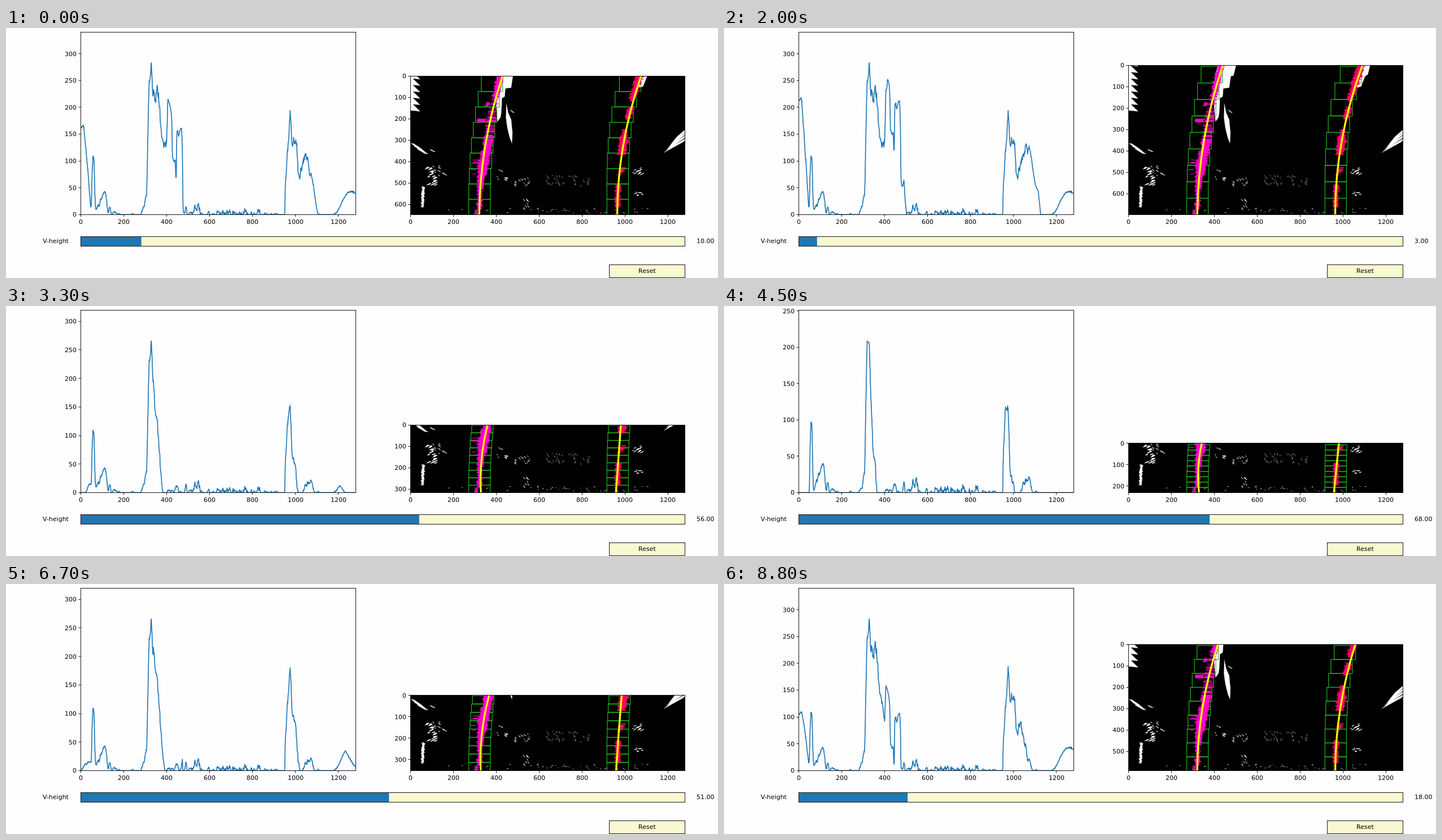
An HTML page with a canvas for the animation above (9800 ms loop, 1261 by 444 pixels).

```html
<!DOCTYPE html>
<html lang="en">
<head>
<meta charset="utf-8">
<title>Lane histogram with crop slider</title>
<style>
  html, body { margin: 0; width: 100%; height: 100%; overflow: hidden; background: #fefdff; }
  canvas { display: block; width: 1261px; height: 444px; }
</style>
</head>
<body>
<canvas id="stage" width="1261" height="444"></canvas>
<script>
const W = 1261, H = 444, LOOP = 9800;
const COLS = 1280, ROWS = 720, SCALE = 0.38; // road image and its size on the stage
const PLOT = { left: 132.7, right: 619, top: 7.8, bottom: 331.4 };
const VIEW = { left: 716.2, right: 1202.5, bottom: 331.7 };
const BLUE = '#1f77b4', CREAM = '#f9f9d1', PAPER = '#fefdff';
const PINK = 'rgb(255,0,200)', RED = 'rgb(255,0,100)';

// Slider value (percent cropped from the top) from each moment on.
const TIMELINE = [
  [0, 10], [400, 9], [700, 7], [1000, 4], [1200, 2], [1500, 1], [2000, 3],
  [2300, 6], [2500, 14], [2600, 22], [2800, 33], [3000, 42], [3100, 50], [3300, 56],
  [3400, 59], [3600, 62], [3700, 64], [3900, 66], [4500, 68],
  [6000, 66], [6200, 63], [6400, 59], [6500, 55], [6700, 51], [6900, 37],
  [7200, 27], [7500, 26], [7700, 24], [7800, 21], [8000, 18],
];

const mix = (a, b, t) => a + (b - a) * t;
const clamp01 = t => Math.min(1, Math.max(0, t));
const snap = n => Math.floor(n) + 0.5;

function random(seed) {
  return () => (seed = seed * 16807 % 2147483647) / 2147483647;
}
const rnd = random(271828);

// Layers are drawn in image pixels, with heights measured up from the bottom.
function layer(draw) {
  const canvas = document.createElement('canvas');
  canvas.width = COLS;
  canvas.height = ROWS;
  const g = canvas.getContext('2d');
  g.setTransform(1, 0, 0, -1, 0, ROWS);
  draw(g);
  return canvas;
}

function polygon(g, ...points) {
  g.beginPath();
  for (let i = 0; i < points.length; i += 2) g.lineTo(points[i], points[i + 1]);
  g.fill();
}

function streak(g, x1, y1, x2, y2, width) {
  const dx = (x2 - x1) * 0.3, dy = (y2 - y1) * 0.3;
  polygon(g, x1, y1, x1 + dx, y1 + dy + width / 2, x2, y2, x2 - dx, y2 - dy - width / 2);
}

function scatter(g, count, x, y, w, h, length, slope, width = 5) {
  for (let i = 0; i < count; i++) {
    const px = x + rnd() * w, py = y + rnd() * h, l = length * (0.4 + rnd());
    streak(g, px, py, px + l, py + l * slope, width);
  }
}

// Ragged band through [height, left, right] stations.
function smear(g, stations, density = 1, rough = 12) {
  for (let i = 1; i < stations.length; i++) {
    const [y1, l1, r1] = stations[i - 1], [y2, l2, r2] = stations[i];
    for (let y = y1; y < y2; y += 3) {
      const t = (y - y1) / (y2 - y1);
      const left = mix(l1, l2, t) + (rnd() - 0.5) * rough;
      const right = mix(r1, r2, t) + (rnd() - 0.5) * rough;
      if (rnd() < density) g.fillRect(left, y, right - left, Math.min(3, y2 - y));
    }
  }
}

const whiteLayer = layer(g => {
  g.fillStyle = '#fff';
  for (let y = 483; y < ROWS; y += 30) polygon(g, 0, y + 45, 46, y, 8, y + 4, 0, y + 4);
  for (let i = 0; i < 3; i++) streak(g, i * 14, 335 - i * 13, 56 + i * 14, 306 - i * 11, 12);
  for (let i = 0; i < 4; i++) streak(g, 1178 + i * 12, 288 + i * 14, 1310, 372 + i * 17, 15);
  streak(g, 88, 305, 118, 294, 6);
  streak(g, 463, 490, 486, 476, 6);
  // Beside the left lane, a loose blob, and beside the right lane.
  polygon(g, 406, 435, 420, 455, 424, 477, 427, 545, 440, 552, 443, 590, 470, 594, 478, 648,
    490, 650, 502, 698, 512, 720, 424, 720, 404, 648, 400, 500);
  polygon(g, 447, 524, 455, 480, 470, 445, 476, 385, 474, 332, 463, 360, 452, 405, 445, 455);
  polygon(g, 1060, 590, 1085, 600, 1104, 648, 1116, 655, 1127, 698, 1140, 720, 1090, 720);
  smear(g, [[35, 51, 62], [132, 54, 67]], 1, 6);
  scatter(g, 20, 58, 135, 55, 85, 20, 0.5, 7);
  scatter(g, 11, 95, 180, 70, 52, 15, -0.6);
  scatter(g, 9, 395, 160, 55, 60, 13, -0.4);
  scatter(g, 18, 482, 140, 70, 34, 10, -0.7);
  scatter(g, 9, 522, 32, 22, 46, 11, -0.9);
  scatter(g, 40, 630, 138, 205, 48, 6, -1.5, 4);
  scatter(g, 13, 1030, 182, 50, 40, 17, 0.6);
  scatter(g, 7, 1037, 88, 45, 18, 16, 0.2);
  scatter(g, 45, 140, 4, 970, 26, 8, 0.2, 3);
});

const laneLayer = layer(g => {
  g.fillStyle = PINK;
  smear(g, [[0, 301, 313], [24, 303, 314]]);
  smear(g, [[24, 312, 332], [110, 313, 334], [140, 313, 343], [230, 313, 362], [316, 338, 381], [353, 339, 388]]);
  smear(g, [[353, 340, 388], [400, 352, 391], [451, 360, 397], [547, 382, 412]], 0.68);
  smear(g, [[547, 382, 412], [648, 404, 434], [720, 424, 450]]);
  smear(g, [[432, 308, 352], [449, 312, 356]]);
  smear(g, [[505, 350, 366], [527, 352, 371]], 0.8);
  smear(g, [[183, 284, 308], [262, 290, 314]], 0.25);
  g.fillStyle = RED;
  smear(g, [[0, 958, 968], [35, 958, 968]], 0.3);
  smear(g, [[35, 955, 978], [142, 957, 983]]);
  smear(g, [[185, 966, 986], [222, 982, 1008]], 0.7);
  smear(g, [[280, 966, 1000], [340, 972, 1016], [400, 990, 1008]]);
  smear(g, [[445, 1000, 1026], [505, 1014, 1044]]);
  smear(g, [[530, 1018, 1040], [590, 1034, 1068], [648, 1050, 1088], [720, 1076, 1108]]);
});

const mask = (() => {
  const canvas = document.createElement('canvas');
  canvas.width = COLS;
  canvas.height = ROWS;
  const g = canvas.getContext('2d');
  g.drawImage(whiteLayer, 0, 0);
  g.drawImage(laneLayer, 0, 0);
  return g.getImageData(0, 0, COLS, ROWS).data;
})();

// Lit pixels per column below the crop.
function countColumns(crop) {
  const counts = new Array(COLS).fill(0);
  for (let i = crop * COLS; i < ROWS * COLS; i++) {
    if (mask[i * 4 + 3] > 127) counts[i % COLS]++;
  }
  return counts;
}

const c = document.getElementById('stage').getContext('2d');

function text(string, x, y, align = 0) {
  c.fillStyle = '#000';
  c.fillText(string, Math.round(x - c.measureText(string).width * align), Math.round(y));
}

function line(x1, y1, x2, y2) {
  c.beginPath();
  c.moveTo(x1, y1);
  c.lineTo(x2, y2);
  c.stroke();
}

function frameBox(left, top, right, bottom) {
  c.strokeStyle = '#000';
  c.lineWidth = 0.9;
  c.strokeRect(snap(left), snap(top), snap(right) - snap(left), snap(bottom) - snap(top));
}

function axes({ left, right, bottom }, top, yTicks) {
  frameBox(left, top, right, bottom);
  for (let n = 0; n <= 1200; n += 200) {
    const x = left + n * SCALE;
    line(snap(x), bottom, snap(x), bottom + 4);
    text(n, x, 348, 0.5);
  }
  for (const [n, y] of yTicks) {
    line(left - 4, snap(y), left, snap(y));
    text(n, left - 7.7, y + 4, 1);
  }
}

function ticks(limit, step, place) {
  const list = [];
  for (let n = 0; n < limit; n += step) list.push([n, place(n)]);
  return list;
}

function clipped(x, y, w, h, draw) {
  c.save();
  c.beginPath();
  c.rect(x, y, w, h);
  c.clip();
  draw();
  c.restore();
}

function drawPlot(crop) {
  const counts = countColumns(crop);
  const limit = 1.2 * Math.max(...counts);
  const place = n => mix(PLOT.bottom, PLOT.top, n / limit);
  clipped(PLOT.left, PLOT.top, PLOT.right - PLOT.left, PLOT.bottom - PLOT.top, () => {
    c.strokeStyle = BLUE;
    c.lineWidth = 1.65;
    c.lineJoin = 'round';
    c.beginPath();
    counts.forEach((n, x) => c.lineTo(PLOT.left + x * SCALE, place(n)));
    c.stroke();
  });
  axes(PLOT, PLOT.top, ticks(limit, 50, place));
}

const viewX = x => VIEW.left + x * SCALE;
const viewY = height => VIEW.bottom - height * SCALE;

// Nine search windows per lane, each centred on the lane just below it.
function drawWindows(rows) {
  const size = Math.floor(rows / 9);
  c.strokeStyle = '#1cc01c';
  c.lineWidth = 1.15;
  for (let k = 0; k < 9; k++) {
    const below = Math.max(0, k - 0.5) * size;
    for (const x of [322 + 2e-4 * below ** 2, 966 + 3.7e-7 * below ** 3]) {
      c.strokeRect(viewX(x - 50), viewY((k + 1) * size), 100 * SCALE, size * SCALE);
    }
  }
}

// Parabola sagging left of the chord from bottom to top.
function drawFit(bottom, top, sag, rows) {
  c.beginPath();
  c.moveTo(viewX(bottom), viewY(0));
  c.quadraticCurveTo(viewX((bottom + top) / 2 - 2 * sag), viewY(rows / 2), viewX(top), viewY(rows));
  c.stroke();
}

function drawView(crop) {
  const rows = ROWS - crop, top = viewY(rows), width = VIEW.right - VIEW.left, height = rows * SCALE;
  const paste = image => c.drawImage(image, 0, crop, COLS, rows, VIEW.left, top, width, height);
  clipped(VIEW.left, top, width, height, () => {
    c.imageSmoothingQuality = 'high';
    c.fillStyle = '#000';
    c.fillRect(VIEW.left, top, width, height);
    paste(whiteLayer);
    drawWindows(rows);
    paste(laneLayer);
    const open = clamp01((rows - 316) / 231), upper = Math.max(0, rows - 340);
    c.strokeStyle = '#ff0';
    c.lineWidth = 3.3;
    drawFit(329 - 8 * open, 293 + 0.21 * rows, 0.04 * rows, rows);
    drawFit(958 + 6 * open, 981 + 0.305 * upper, 0.09 * upper, rows);
  });
  axes(VIEW, top, ticks(rows, 100, n => top + n * SCALE));
}

function drawControls(v, hover) {
  const { left } = PLOT, { right } = VIEW;
  c.fillStyle = CREAM;
  c.fillRect(left, 371, right - left, 16);
  c.fillStyle = BLUE;
  c.fillRect(left, 371, (right - left) * v / 100, 16);
  frameBox(left, 370, right, 387);
  text('V-height', 110.6, 382, 1);
  text(v.toFixed(2), 1223.3, 382);
  c.fillStyle = hover ? '#f9f9f9' : CREAM;
  c.fillRect(1068.5, 420.5, 134, 23);
  frameBox(1068, 420, 1202, 443);
  text('Reset', 1135, 435, 0.5);
}

let shown = '';
function render(now) {
  const t = now % LOOP;
  const v = TIMELINE.findLast(step => step[0] <= t)[1];
  const hover = t >= 8500 && t < 8800;
  const state = v + ' ' + hover;
  if (state === shown) return;
  shown = state;
  const crop = Math.floor(ROWS * v / 100);
  c.fillStyle = PAPER;
  c.fillRect(0, 0, W, H);
  c.font = '11px "DejaVu Sans", sans-serif';
  drawPlot(crop);
  drawView(crop);
  drawControls(v, hover);
}

const start = performance.now();
function tick() {
  render(performance.now() - start);
  requestAnimationFrame(tick);
}
tick();
</script>
</body>
</html>
```
